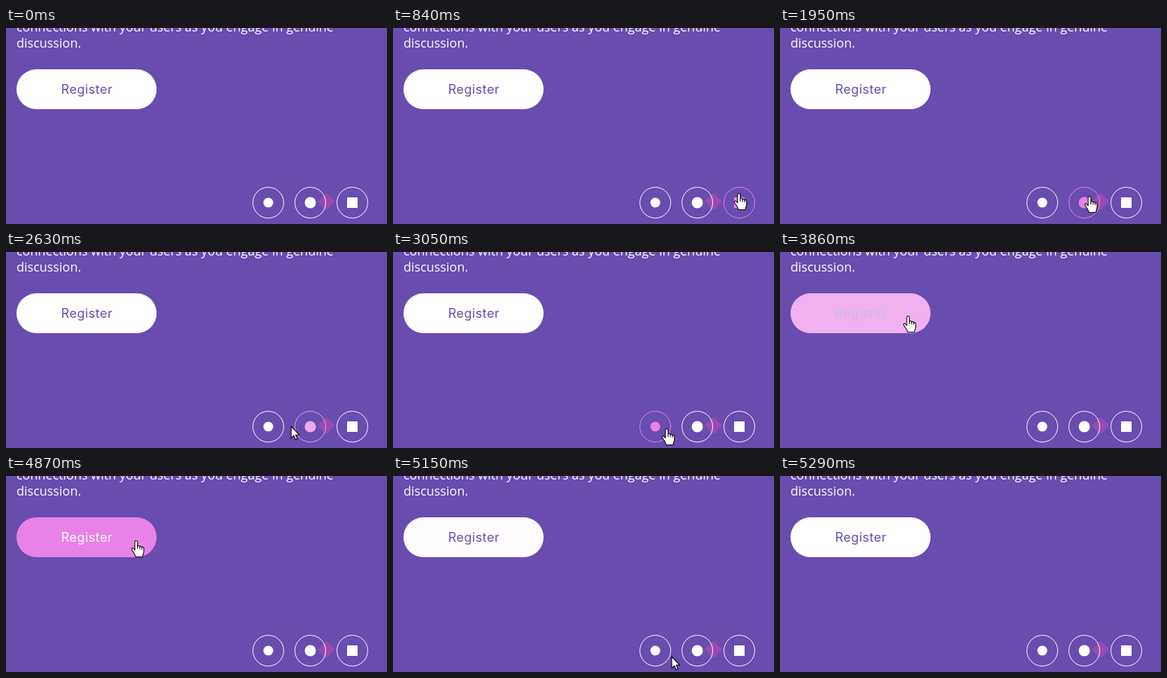
Recreate the animation shown at these times as an HTML page. Size 544 px wide and 280 px high, loop 5.36 s.

```html
<!DOCTYPE html>
<html lang="en">
<head>
<meta charset="utf-8">
<title>Register</title>
<style>
  html, body { margin: 0; width: 100%; height: 100%; overflow: hidden; background: #684cae; }
  svg { display: block; width: 100vw; height: 100vh; }
  .copy { font: 18px "Open Sans", sans-serif; fill: #fff; }
  .label { font: 18px Inter, sans-serif; letter-spacing: .5px; text-anchor: middle; }
  .ring { fill: none; stroke-width: 1; }
  .cursor path { fill: #fff; stroke: #000; stroke-width: 1.1; stroke-linejoin: round; }
  .cursor .line { fill: none; }
</style>
</head>
<body>
<svg viewBox="0 0 544 280">
  <rect width="544" height="280" fill="#684cae"/>
  <text class="copy" x="15" y="5">connections with your users as you engage in genuine</text>
  <text class="copy" x="15" y="28">discussion.</text>

  <rect id="button" x="15" y="59" width="200" height="57" rx="28.5"/>
  <text id="label" class="label" x="115.5" y="94">Register</text>

  <path d="M457.5 235.5L470 248L457.5 260.5L445 248Z" fill="#984bb0"/>
  <g id="links">
    <g><circle class="ring" cx="374.5" cy="249.5" r="22"/><circle cx="374.5" cy="249.5" r="7"/></g>
    <g><circle class="ring" cx="434.5" cy="249.5" r="22"/><circle cx="434.5" cy="249.5" r="8"/></g>
    <g><circle class="ring" cx="494.5" cy="249.5" r="22"/><rect x="487" y="242" width="15" height="15"/></g>
  </g>

  <g id="cursor" class="cursor">
    <g id="hand">
      <path d="M-2 1.2C-2 -1 1.8 -1 1.8 1.2V7.2C2.6 6 5 6.2 5 8C6 7 8 7.2 8 9C9 8.2 10.8 8.6 10.8 10.4V15C10.8 18 9 19 9 22.5H-1C-1 20 -3 18 -4 16L-6.5 12C-7.2 10.5 -5 9.3 -3.6 11L-2 12.8Z"/>
      <path class="line" d="M1.8 7.2V11M5 8V11.5M8 9V12"/>
    </g>
    <path id="arrow" d="M0 0V16.5L3.8 13L6.3 18.8L8.8 17.7L6.4 12H11.5Z"/>
  </g>
</svg>
<script>
const LOOP = 5360, STEP = 70, FADE = 260;
const PURPLE = [104, 76, 174], WHITE = [255, 255, 255], PINK = [232, 130, 232];
const $ = id => document.getElementById(id);

const mix = (a, b, k) => `rgb(${a.map((v, i) => Math.round(v + (b[i] - v) * k))})`;
const clamp = (v, lo, hi) => Math.min(hi, Math.max(lo, v));
const lerp = (a, b, k) => [a[0] + (b[0] - a[0]) * k, a[1] + (b[1] - a[1]) * k];

// Eight eased steps between two resting places
const slide = (a, b) => Array.from({ length: 8 }, (_, i) => {
  const u = (i + 1) / 8;
  return lerp(a, b, u * u * (3 - 2 * u));
});

const RIGHT = [494, 237], MIDDLE = [442, 241], LEFT = [391, 253], ON_BUTTON = [183, 92];

// start, end of the activity, cursor points one step apart
const legs = [
  [0, 0, [[500, 300]]],
  [490, 840, [[499, 272], [498, 262], [497, 252], [496, 244], [494.5, 239], RIGHT]],
  [1390, 1950, slide(RIGHT, MIDDLE)],
  [2350, 3050, slide(MIDDLE, LEFT)],
  [3510, 4000, [.04, .25, .62, .89, .98, 1].map(k => lerp(LEFT, ON_BUTTON, k))],
  [4130, 4130, [[184, 92]]],
  [4870, 5290, [[186, 93], [206, 110], [268, 156], [340, 207], [398, 258], [430, 271], [440, 300]]]
];

// hover start and end
const linkHover = [[2740, 3510], [1690, 2590], [540, 1555]];
const buttonHover = [3760, 4930];

const ease = u => 1 - (1 - clamp(u, 0, 1)) ** 2;
const hover = (t, [on, off]) => t < off ? ease((t - on) / FADE) : 1 - ease((t - off) / FADE);

const overTarget = (x, y) =>
  Math.hypot(x - clamp(x, 43.5, 186.5), y - 87.5) < 28.5 ||
  [374.5, 434.5, 494.5].some(cx => Math.hypot(x - cx, y - 249.5) < 22.5);

function draw(time) {
  const [start, end, points] = legs.filter(leg => leg[0] <= time).pop();
  const n = Math.floor((Math.min(time, end) - start) / STEP);
  const t = start + n * STEP;
  const [x, y] = points[Math.min(n, points.length - 1)];

  const k = hover(t, buttonHover);
  $('button').setAttribute('fill', mix(WHITE, PINK, k));
  $('label').setAttribute('fill', mix(PURPLE, WHITE, k));

  [...$('links').children].forEach((link, i) => {
    const color = mix(WHITE, PINK, hover(t, linkHover[i]));
    link.setAttribute('fill', color);
    link.setAttribute('stroke', color);
    link.lastElementChild.setAttribute('stroke', 'none');
  });

  const hand = overTarget(x, y);
  $('cursor').setAttribute('transform', `translate(${x} ${y})`);
  $('hand').setAttribute('visibility', hand ? 'visible' : 'hidden');
  $('arrow').setAttribute('visibility', hand ? 'hidden' : 'visible');
}

const begin = performance.now();
function tick() {
  draw((performance.now() - begin) % LOOP);
  requestAnimationFrame(tick);
}
tick();
</script>
</body>
</html>
```
